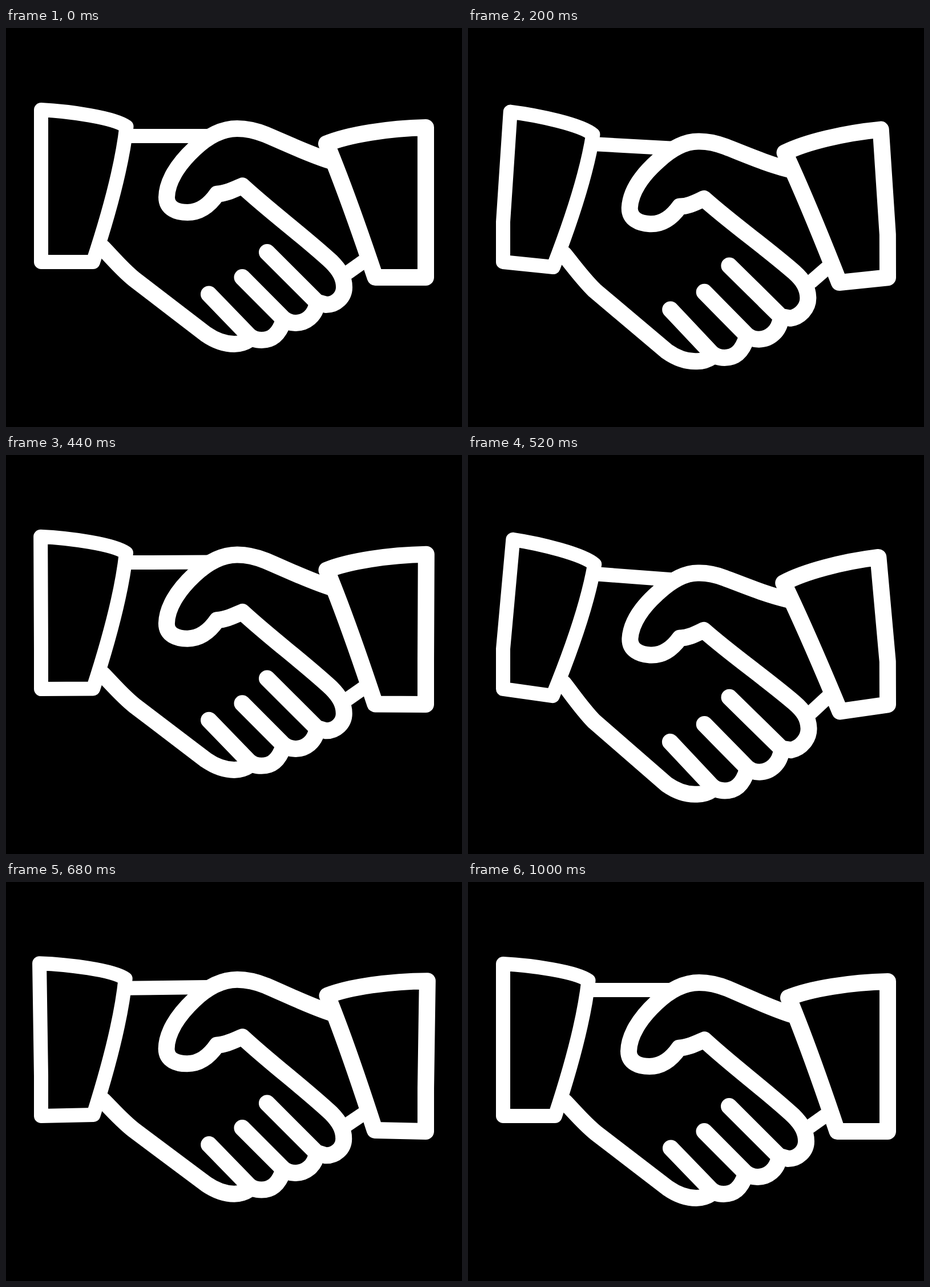
These frames come from a looping animation (799x700 px, 1.56 s). An HTML page:

```html
<!DOCTYPE html>
<html lang="en">
<head>
<meta charset="utf-8">
<title>Handshake</title>
<style>
html, body { margin: 0; height: 100%; overflow: hidden; background: #000; }
svg { display: block; width: 100vw; height: 100vh; }
path { fill: none; stroke: #fff; stroke-width: 29; stroke-linecap: round; stroke-linejoin: round; }
.thin { stroke-width: 25; }
</style>
</head>
<body>
<svg viewBox="0 0 799 700">
  <!-- left cuff and wrist -->
  <path class="thin" d="M61.5 143.5 C110 146 190 157 211 173 C203 245 179 330 152.5 410.5 L61.5 410.5 L61.5 340 Z"/>
  <path class="thin" d="M212 189.5 L356 189.5"/>
  <!-- right cuff and wrist -->
  <path d="M561.5 203 C600 187 670 176 735.5 174.5 L735.5 362 L735.5 437.5 L647 437.5 C616 345 583 255 561.5 203 Z"/>
  <path class="thin" d="M599 429 L630 407"/>
  <!-- thumb, index finger and first knuckle -->
  <path d="M568 233 C530 221 495 204 455 187 C435 179 420 176.5 405 176.5 C375 176.5 350 193 330 212 C300 240 282 270 281.5 297 C281.5 317 300 323.5 318 323.5 C340 323.5 357 310 370 291 C385 291 400 283 414 277 C465 324 520 364 570 410 C585 425 592.5 438 592.5 455 C592.5 472 578 485.5 561 485.5 L545 481 L457.5 393.5"/>
  <!-- remaining knuckles and fingers -->
  <path d="M545 483 C542 505 525 517.5 507 517.5 C499 517.5 492 515 486 510 L414 437.5"/>
  <path d="M486 514 C478 538 465 547.5 448 547.5 C438 547.5 431 545 425 539 L355.5 467"/>
  <path d="M427 546 C418 552 409 554.5 400 554.5 C380 554.5 363 546 350 537 L225 441 C205 425 190 407 170 386"/>
</svg>
<script>
const FRAME = 40, LOOP = 1560;
// [time, bend]: positive sinks the hands, negative lifts them
const keys = [[0, 0], [175, .8], [383, -1.03], [500, 1.01], [825, -1.02], [1000, 0], [LOOP, 0]];
const paths = [...document.querySelectorAll('path')].map(el => ({ el, d: el.getAttribute('d') }));

function bendAt(t) {
  const i = keys.findIndex(k => k[0] > t);
  const [t0, a] = keys[i - 1], [t1, b] = keys[i];
  const s = (t - t0) / (t1 - t0);
  return a + (b - a) * s * s * (3 - 2 * s);
}

// The lower outer cuff corners stay fixed while the centre swings
function warp(x, y, p) {
  const u = Math.abs(x - 400), r = u / 338;
  const pivot = 338 + .036 * x;
  const above = u > 320 ? Math.max(0, pivot - y) : pivot - y;
  const dx = Math.sign(400 - x) * .089 * r ** (above > 0 ? .6 : 1.1) * above * p;
  const lift = 31 * (1 - r ** 1.6) + .025 * Math.max(0, above) * r ** 4;
  const fade = Math.min(1, Math.max(0, (250 - u) / 100));
  const low = (Math.max(0, y - 330) / 239) ** 1.2 * fade;
  const dy = lift * p + low * ((13 + .06 * u) * p - 2 * p * p);
  return (x + dx).toFixed(2) + ' ' + (y + dy).toFixed(2);
}

function draw(now) {
  const p = bendAt(Math.floor(now % LOOP / FRAME) * FRAME);
  for (const { el, d } of paths)
    el.setAttribute('d', d.replace(/([\d.]+) ([\d.]+)/g, (_, x, y) => warp(+x, +y, p)));
  requestAnimationFrame(draw);
}
draw(0);
</script>
</body>
</html>
```
